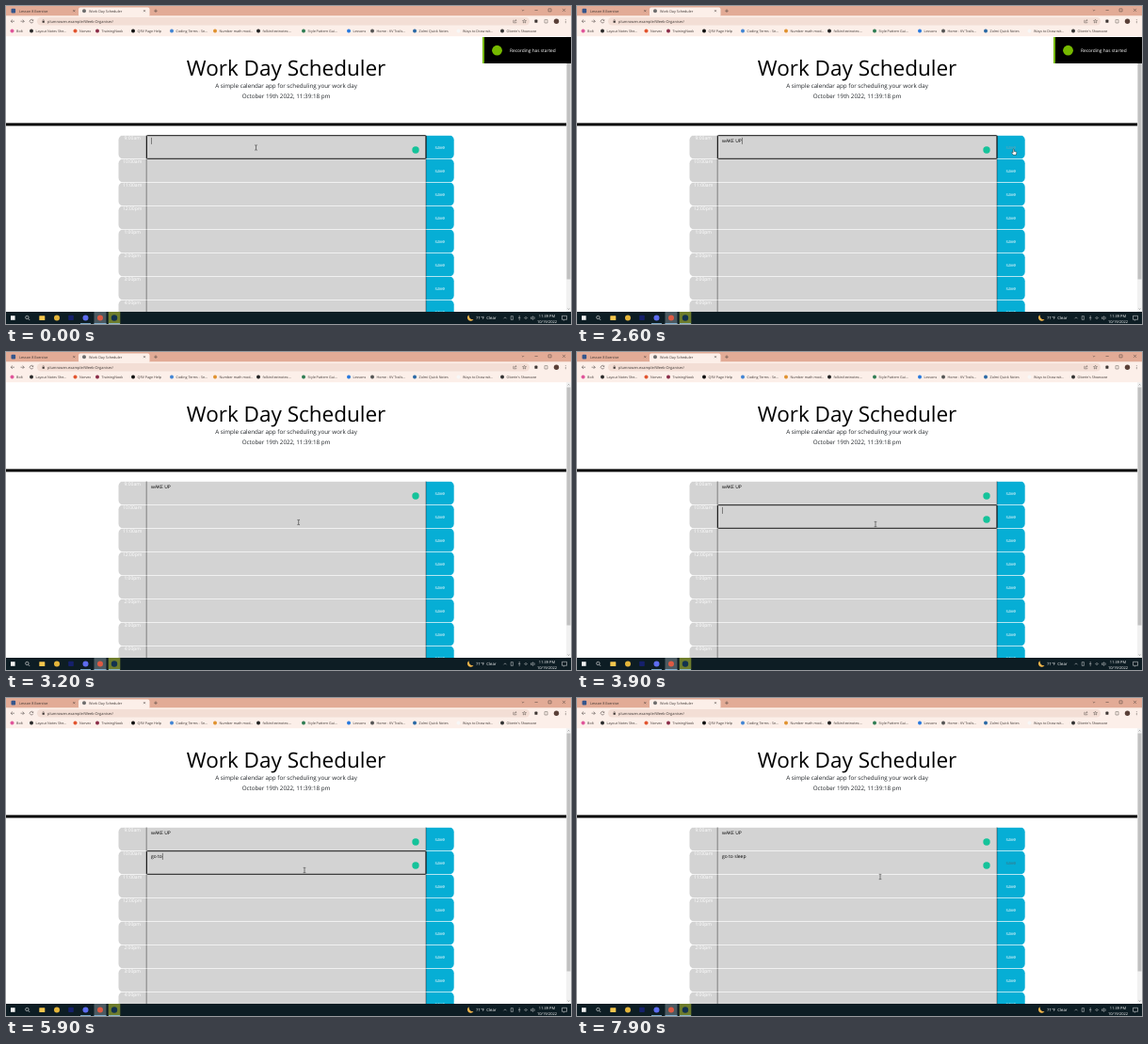
Animation of 600x338 px, one loop 8000 ms. Source, as an HTML page:

```html
<!DOCTYPE html>
<html lang="en">
<head>
<meta charset="utf-8">
<title>Work Day Scheduler</title>
<style>
html, body { margin: 0; width: 100%; height: 100%; overflow: hidden; background: #fff; }
svg { display: block; width: 100vw; height: 100vh; }
text { font-family: "Open Sans", "Noto Sans", sans-serif; text-rendering: geometricPrecision; white-space: pre; }
</style>
</head>
<body>
<svg id="stage" viewBox="0 0 600 338" preserveAspectRatio="none">
  <g id="page"></g>
  <g id="browser"></g>
  <g id="toast"></g>
  <g id="taskbar"></g>
  <g id="pointer">
    <path id="beam" d="M-1.3-2.6h1l.3.3.3-.3h1M0-2.3v4.6M-1.3 2.6h1l.3-.3.3.3h1" fill="none" stroke="#222" stroke-width=".55"/>
    <path id="hand" d="M-.9-2.6q.6-.6 1.1 0v2l2.1.6q.7.3.5 1.1l-.5 2.2h-3l-1.7-2.4q.1-.8.8-.4l.7.5z" fill="#fff" stroke="#111" stroke-width=".45"/>
    <path id="arrow" d="M-1.5-2.5v5.2l1.2-1.1.9 1.9.8-.4-.9-1.8h1.7z" fill="#fff" stroke="#111" stroke-width=".4"/>
  </g>
</svg>
<script>
const LOOP = 8000;
const $ = id => document.getElementById(id);

function add(parent, tag, attrs, content) {
  const node = document.createElementNS('http://www.w3.org/2000/svg', tag);
  for (const key in attrs) node.setAttribute(key, attrs[key]);
  if (content !== undefined) node.textContent = content;
  return parent.appendChild(node);
}
const rect = (g, x, y, width, height, fill, rx = 0) => add(g, 'rect', { x, y, width, height, fill, rx });
const dot = (g, cx, cy, r, fill) => add(g, 'circle', { cx, cy, r, fill });
const line = (g, d, stroke, width = .5) => add(g, 'path', { d, stroke, 'stroke-width': width, fill: 'none' });
const label = (g, x, y, size, fill, content, anchor = 'start') =>
  add(g, 'text', { x, y, 'font-size': size, fill, 'text-anchor': anchor }, content);
const show = (node, on) => node.setAttribute('visibility', on ? 'visible' : 'hidden');

// Page
const page = $('page');
const ROW_TOP = 137.5, ROW_H = 25, LEFT = 119.5, FIELD = 149.2, SAVE = 446, RIGHT = 475.7;

rect(page, 0, 32, 600, 293, '#fff');
label(page, 297.5, 74.2, 22.5, '#000', 'Work Day Scheduler', 'middle');
label(page, 297.5, 87.1, 6.25, '#212529', 'A simple calendar app for scheduling your work day', 'middle');
label(page, 297.5, 98.3, 6.25, '#212529', 'October 19th 2022, 11:39:18 pm', 'middle');
rect(page, 0, 124.4, 595, 3, '#000');

const hours = ['9:00am', '10:00am', '11:00am', '12:00pm', '1:00pm', '2:00pm', '3:00pm', '4:00pm'];
const saves = hours.map((hour, i) => {
  const y = ROW_TOP + i * ROW_H;
  const r = 4.7, side = FIELD - LEFT - r, tall = ROW_H - 2 * r;
  add(page, 'path', { fill: '#d3d3d3', d: `M${FIELD} ${y}h${-side}a${r} ${r} 0 0 0 ${-r} ${r}v${tall}a${r} ${r} 0 0 0 ${r} ${r}h${side}z` });
  rect(page, FIELD, y, SAVE - FIELD, ROW_H, '#d3d3d3');
  add(page, 'path', { fill: '#06aed5', d: `M${SAVE} ${y}h${side}a${r} ${r} 0 0 1 ${r} ${r}v${tall}a${r} ${r} 0 0 1 ${-r} ${r}h${-side}z` });
  line(page, `M${LEFT + 3} ${y}H${RIGHT - 3}`, '#fff', .6);
  line(page, `M${FIELD} ${y}v${ROW_H}M${SAVE} ${y}v${ROW_H}`, '#222', .5);
  label(page, 134.2, y + 4.8, 5, '#fff', hour, 'middle');
  return label(page, 460.8, y + 14.5, 5, '#fff', 'save', 'middle');
});

rect(page, 595, 32, 5, 293, '#f1f1f1');
rect(page, 595.5, 37.5, 4, 253, '#c1c1c1');
line(page, 'M596.6 35.4l.9-1 .9 1M596.6 321.5l.9 1 .9-1', '#666', .5);

// Browser frame
const browser = $('browser');
const INK = '#3c3532';
rect(browser, 0, 0, 600, 11, '#e2ab96');
rect(browser, 77, 1.5, 75.5, 10, '#fcefe9', 2);
rect(browser, 0, 10.3, 600, 21.9, '#fcefe9');
rect(browser, 33, 11.9, 523, 8.6, '#f3ded5', 4.3);
rect(browser, 5.5, 2.8, 4.6, 4.6, '#35568c', 1);
label(browser, 14, 6.5, 3.75, INK, 'Lesson 8 Exercise');
dot(browser, 83, 5.2, 2, '#6d6d6d');
label(browser, 88, 6.5, 3.75, INK, 'Work Day Scheduler');
const cross = (x, y, s) => `M${x - s} ${y - s}l${2 * s} ${2 * s}m0 ${-2 * s}l${-2 * s} ${2 * s}`;
line(browser, cross(72.3, 5.2, 1) + cross(147, 5.2, 1) + 'M157.2 5.2h3.6m-1.8-1.8v3.6', INK);
line(browser, 'M547.8 4l1.2 1.2 1.2-1.2M561.5 4.5h3.2M576 2.9h3v3h-3z' + cross(592.5, 4.4, 1.5), INK, .45);
line(browser, 'M9 16.2H5.2m1.7-1.7l-1.7 1.7 1.7 1.7M15.5 16.2h3.8m-1.7-1.7l1.7 1.7-1.7 1.7M28.6 15.2a1.8 1.8 0 1 0 .2 1.5m0-2.4v1.2h-1.3', INK);
rect(browser, 38.6, 15.8, 2.2, 1.9, INK, .3);
line(browser, 'M39 15.8v-.6a.7.7 0 0 1 1.4 0v.6', INK, .35);
label(browser, 44, 17.6, 3.95, INK, 'plumrowen.example/Week-Organiser/');
line(browser, 'M539.6 15.2h-.8v2.6h3v-1m-1.8 0q.2-1.7 2-1.7m-.7-.8l.8.8-.8.8M550.5 14.2l.6 1.3 1.4.1-1.1 1 .4 1.4-1.3-.8-1.3.8.4-1.4-1.1-1 1.4-.1zM572 14.6h3v3.4h-3z', INK, .4);
rect(browser, 561.4, 14.6, 3, 3.2, INK, .6);
dot(browser, 584.5, 16.2, 2.7, '#5a4038');
[14.6, 16.2, 17.8].forEach(y => dot(browser, 594.2, y, .45, INK));

const bookmarks = [
  [6.5, '#e0569b', 'Bolt'], [27, '#2b2b2b', 'Layout Notes She...'], [73.5, '#e2552f', 'Norvex'],
  [97, '#8a2c48', 'TrainingNook'], [135, '#111111', 'QRV Page Help'], [176, '#4285d4', 'Coding Terms - Se...'],
  [222, '#e0922f', 'Number math mod...'], [268, '#222222', 'folkin/textnotes:...'], [316, '#2f7d53', 'Style Pattern Gui...'],
  [364, '#2879de', 'Lessons'], [389, '#555555', 'Home - KV Trails...'], [434, '#2a69a5', 'Zolmi Quick Notes'],
  [480.5, '#f7f7f7', 'Ways to Draw wit...'], [527, '#333333', "Oberin's Showcase"]
];
bookmarks.forEach(([x, color, name]) => {
  dot(browser, x, 26.5, 2, color);
  label(browser, x + 4.6, 27.8, 3.65, INK, name);
});

// Recording notice
const toast = $('toast');
rect(toast, 506, 33, 94, 28, '#000');
rect(toast, 506, 33, 2, 28, '#76b900');
dot(toast, 521.5, 47.2, 5.4, '#76b900');
label(toast, 535, 49, 4.8, '#fff', 'Recording has started');

// Taskbar
const bar = $('taskbar');
rect(bar, 0, 325, 600, 13, '#0d1d24');
rect(bar, 5, 329.2, 4.6, 4.6, '#f2f2f2');
add(bar, 'circle', { cx: 22.4, cy: 331, r: 1.7, fill: 'none', stroke: '#eee', 'stroke-width': .6 });
line(bar, 'M23.7 332.3l1.5 1.7', '#eee', .6);
rect(bar, 35.3, 329.2, 6, 4.8, '#f5c64d', .5);
dot(bar, 54, 331.5, 3, '#e4b53a');
rect(bar, 66.2, 328.7, 5.6, 5.4, '#15206c', .8);
dot(bar, 84.5, 331.5, 3, '#5d6cf0');
rect(bar, 93.5, 325, 13, 13, '#4b5a61');
dot(bar, 100, 331.5, 3, '#dd5a43');
rect(bar, 108.7, 325, 12.6, 13, '#6d7c2c');
dot(bar, 115, 331.5, 3.2, '#12324f');
[[79, 11], [93.5, 13], [109, 12]].forEach(([x, w]) => rect(bar, x, 337.2, w, .8, '#8fc4e8'));
add(bar, 'path', { d: 'M491.5 328.2a3.6 3.6 0 1 0 5 5q-5 .2-5-5z', fill: '#f4b64a' });
label(bar, 499, 333.1, 4.3, '#fff', '71°F  Clear');
line(bar, 'M528.5 332.3l1.5-1.5 1.5 1.5M536.2 329.6h2.2v3.8h-2.2zM545.2 329v3M544 331a1.3 1.3 0 0 0 2.4 0M545.2 332.5v1.5M550.3 331.6q1.7-2 3.5 0m-2.6.9q.8-.9 1.7 0M557.5 330.8h1l1.2-1v3.6l-1.2-1h-1zM560.8 330.2q1 1.3 0 2.8', '#eee', .45);
label(bar, 574.5, 330.5, 4, '#fff', '11:39 PM', 'middle');
label(bar, 574.5, 336.5, 4, '#fff', '10/19/2022', 'middle');
add(bar, 'path', { d: 'M590.5 329.3h5v4h-2l-1 1v-1h-2z', fill: 'none', stroke: '#eee', 'stroke-width': .5 });

// Editable rows: key times in ms, focus from/to
const entries = [
  { row: 0, text: 'wAKE UP', keys: [700, 900, 1000, 1100, 1200, 1300, 1400], focus: [0, 2750], blinkFrom: -200 },
  { row: 1, text: 'go to sleep', keys: [5500, 5600, 5700, 5800, 5900, 6100, 6200, 6300, 6400, 6500, 6700], focus: [3400, 7400], blinkFrom: 3400 }
];
const BLINK = 530, TEXT_X = 154;
entries.forEach(entry => {
  const y = ROW_TOP + entry.row * ROW_H;
  entry.ring = add(page, 'rect', {
    x: FIELD + .2, y: y + .2, width: SAVE - FIELD - .2, height: ROW_H - .4, rx: .8,
    fill: 'none', stroke: '#111', 'stroke-width': 1
  });
  entry.badge = dot(page, 435, y + 15.5, 3.7, '#15c39a');
  entry.node = label(page, TEXT_X, y + 7.5, 5, '#000', '');
  entry.caret = rect(page, 0, y + 2.4, .5, 7, '#222');
});

// Pointer stops: time, x, y
const stops = [
  [0, 265.5, 150.5], [1800, 265.5, 150.5], [2250, 477, 142], [2500, 464, 155], [2800, 464, 155],
  [3200, 310.7, 181], [3400, 317, 183], [6950, 317, 183], [7120, 500, 176], [7300, 463, 179],
  [7480, 463, 179], [7850, 322, 190], [LOOP, 322, 190]
];
function pointerAt(t) {
  const i = stops.findIndex(stop => stop[0] > t);
  const [t0, x0, y0] = stops[i - 1], [t1, x1, y1] = stops[i];
  const u = (t - t0) / (t1 - t0), e = u * u * (3 - 2 * u);
  return [x0 + (x1 - x0) * e, y0 + (y1 - y0) * e];
}
const within = (t, from, to) => t >= from && t < to;

function draw(t) {
  entries.forEach(({ text, keys, focus, blinkFrom, ring, badge, node, caret }) => {
    const typed = keys.filter(k => k <= t);
    const since = t - (typed.length ? typed[typed.length - 1] : blinkFrom);
    const focused = within(t, ...focus);
    node.textContent = text.slice(0, typed.length);
    caret.setAttribute('x', TEXT_X + (typed.length ? node.getComputedTextLength() : 0) + .1);
    show(caret, focused && since % (2 * BLINK) < BLINK);
    show(ring, focused);
    show(badge, t >= focus[0]);
  });

  const [x, y] = pointerAt(t);
  $('pointer').setAttribute('transform', `translate(${x} ${y})`);
  show($('beam'), x < SAVE);
  show($('hand'), x >= SAVE && x < RIGHT);
  show($('arrow'), x >= RIGHT);

  saves[0].setAttribute('fill', within(t, 2400, 2950) ? '#6fa3b1' : '#fff');
  saves[1].setAttribute('fill', t >= 7250 ? '#40707e' : '#fff');

  const slide = Math.min(1, Math.max(0, (t - 2700) / 300));
  toast.setAttribute('transform', `translate(${95 * slide * slide} 0)`);
}

function tick() {
  draw(performance.now() % LOOP);
  requestAnimationFrame(tick);
}
tick();
</script>
</body>
</html>
```
